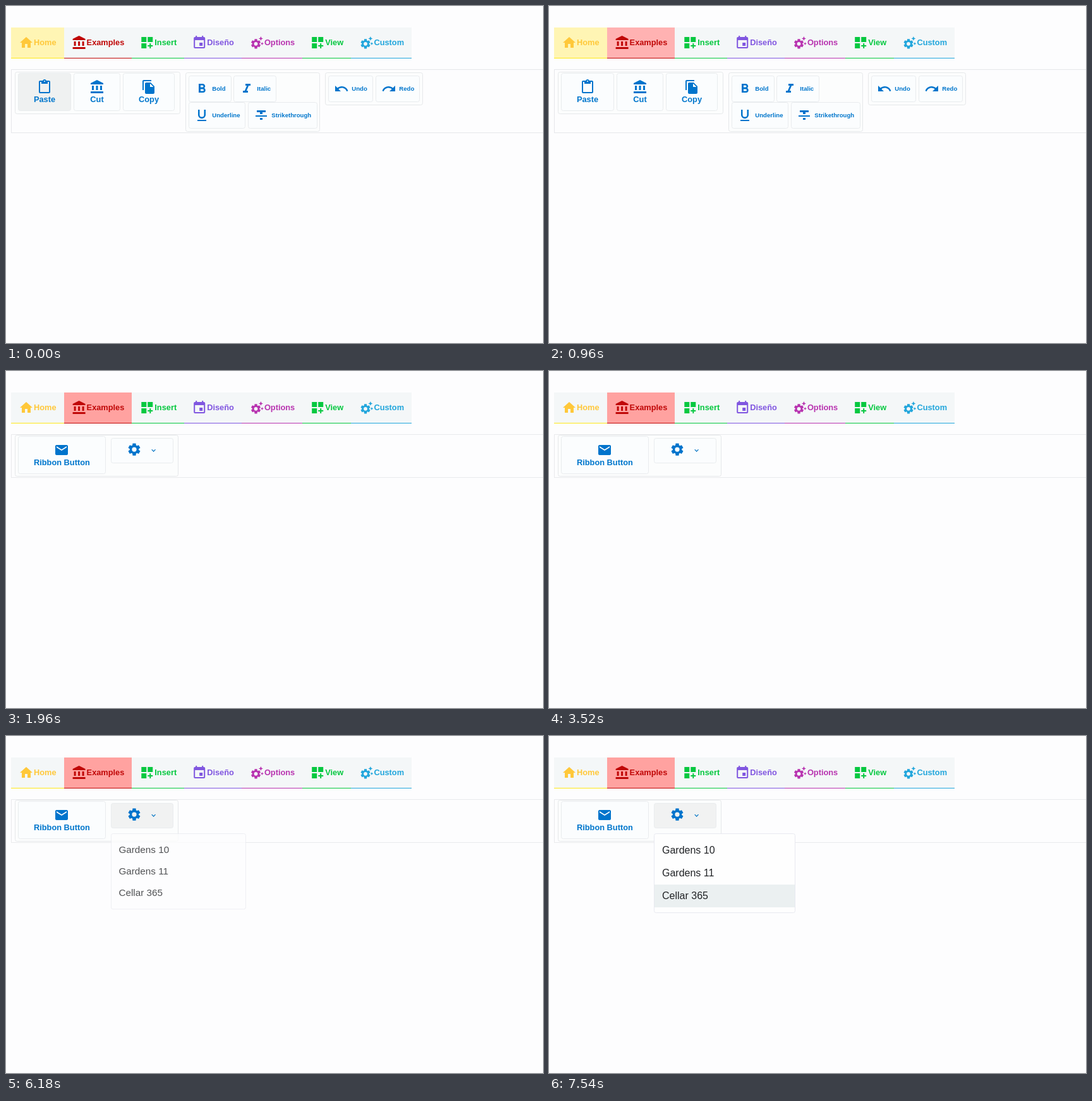
These frames come from a looping animation (850 by 533 pixels, 8000 ms). An HTML page:

```html
<!DOCTYPE html>
<html lang="en">
<head>
<meta charset="utf-8">
<title>Ribbon menu</title>
<style>
html, body { margin: 0; width: 100%; height: 100%; overflow: hidden; background: #fdfdfe; }
svg { display: block; width: 850px; height: 533px; font-family: "Liberation Sans", Arial, sans-serif; }
.tab, .big { font-size: 12.8px; font-weight: bold; }
.small { font-size: 9.6px; font-weight: bold; }
.big, .small { fill: #0076cc; }
.icon { fill: #0074cc; }
.box { fill: #fcfdfd; stroke: #e6e8ea; }
.button { fill: #fbfdfe; stroke: #e9ecee; }
.menu { font-size: 16px; fill: #212326; }
</style>
</head>
<body>
<svg id="stage" viewBox="0 0 850 533"></svg>
<script>
const icons = {
  home: 'M10 20v-6h4v6h5v-8h3L12 3 2 12h3v8z',
  bank: 'M4 10h3v7H4zM10.5 10h3v7h-3zM2 19h20v3H2zM17 10h3v7h-3zM12 1L2 6v2h20V6z',
  grid: 'M3 3h8v8H3zm10 0h8v8h-8zM3 13h8v8H3zm15 0h-2v3h-3v2h3v3h2v-3h3v-2h-3z',
  event: 'M17 12h-5v5h5zM16 1v2H8V1H6v2H5c-1.11 0-2 .9-2 2v14c0 1.1.89 2 2 2h14c1.1 0 2-.9 2-2V5c0-1.1-.9-2-2-2h-1V1zm3 18H5V8h14z',
  gear: 'M16.24 14.37l1.94 1.47-2 3.46-2.25-.93c-.31.22-.65.42-1.01.58l-.3 2.43h-4l-.3-2.43c-.36-.16-.7-.36-1.01-.58l-2.25.93-2-3.46L5 14.37a5 5 0 0 1 0-1.16l-1.94-1.47 2-3.46 2.25.93c.31-.22.65-.42 1.01-.58l.3-2.43h4l.3 2.43c.36.16.7.36 1.01.58l2.25-.93 2 3.46-1.94 1.47a5 5 0 0 1 0 1.16zM10.62 16.7a2.9 2.9 0 1 0 0-5.8 2.9 2.9 0 0 0 0 5.8z',
  stars: 'M17.41 6.59L15 5.5l2.41-1.09L18.5 2l1.09 2.41L22 5.5l-2.41 1.09L18.5 9zM21.28 12.72L20.5 11l-.78 1.72-1.72.78 1.72.78.78 1.72.78-1.72 1.72-.78z',
  paste: 'M19 2h-4.18C14.4.84 13.3 0 12 0S9.6.84 9.18 2H5c-1.1 0-2 .9-2 2v16c0 1.1.9 2 2 2h14c1.1 0 2-.9 2-2V4c0-1.1-.9-2-2-2zm-7 0a1 1 0 1 1 0 2 1 1 0 0 1 0-2zm7 18H5V4h2v3h10V4h2z',
  copy: 'M16 1H4c-1.1 0-2 .9-2 2v14h2V3h12zm-1 4l6 6v10c0 1.1-.9 2-2 2H8c-1.1 0-2-.9-2-2V7c0-1.1.9-2 2-2zm-1 7h5.5L14 6.5z',
  bold: 'M15.6 10.79c.97-.67 1.65-1.77 1.65-2.79 0-2.26-1.75-4-4-4H7v14h7.04c2.09 0 3.71-1.7 3.71-3.79 0-1.52-.86-2.82-2.15-3.42zM10 6.5h3a1.5 1.5 0 0 1 0 3h-3zm3.5 9H10v-3h3.5a1.5 1.5 0 0 1 0 3z',
  italic: 'M10 4v3h2.21l-3.42 8H6v3h8v-3h-2.21l3.42-8H18V4z',
  underline: 'M12 17c3.31 0 6-2.69 6-6V3h-2.5v8a3.5 3.5 0 0 1-7 0V3H6v8c0 3.31 2.69 6 6 6zm-7 2v2h14v-2z',
  strike: 'M10 19h4v-3h-4zM5 4v3h5v3h4V7h5V4zM3 14h18v-2H3z',
  undo: 'M12.5 8c-2.65 0-5.05.99-6.9 2.6L2 7v9h9l-3.62-3.62c1.39-1.16 3.16-1.88 5.12-1.88 3.54 0 6.55 2.31 7.6 5.5l2.37-.78C21.08 11.03 17.15 8 12.5 8z',
  redo: 'M18.4 10.6C16.55 8.99 14.15 8 11.5 8c-4.65 0-8.58 3.03-9.96 7.22L3.9 16c1.05-3.19 4.05-5.5 7.6-5.5 1.95 0 3.73.72 5.12 1.88L13 16h9V7z',
  mail: 'M20 4H4c-1.1 0-2 .9-2 2v12c0 1.1.9 2 2 2h16c1.1 0 2-.9 2-2V6c0-1.1-.9-2-2-2zm0 4l-8 5-8-5V6l8 5 8-5z'
};
icons.magic = icons.gear + icons.stars;

const icon = (name, x, y, attrs = 'class="icon"', scale = 1) =>
  `<path d="${icons[name]}" fill-rule="evenodd" transform="translate(${x} ${y}) scale(${scale})" ${attrs}/>`;
const text = (str, x, y, cls, attrs = '') =>
  `<text x="${x}" y="${y}" class="${cls}" ${attrs}>${str}</text>`;
const rect = (x1, y1, x2, y2, attrs) =>
  `<rect x="${x1}" y="${y1}" width="${x2 - x1}" height="${y2 - y1}" ${attrs}/>`;
const frame = (x1, y1, x2, y2, cls, attrs = '') =>
  rect(x1 + .5, y1 + .5, x2 - .5, y2 - .5, `rx="3" class="${cls}" ${attrs}`);

const idle = '#f4f7f8';
const tabs = [
  ['Home', 'home', 8, '#ffc83a', '#ffe816'], ['Examples', 'bank', 91.6, '#c00808'],
  ['Insert', 'grid', 199.3, '#06c840'], ['Diseño', 'event', 282.2, '#8056e0'],
  ['Options', 'magic', 372.9, '#b834b0'], ['View', 'grid', 469.2, '#06c840'],
  ['Custom', 'magic', 546.4, '#22a6dc']
].map(([label, name, x, color, line = color], i, all) => {
  const left = Math.round(x), right = i < 6 ? Math.round(all[i + 1][2]) : 642;
  return rect(left, 34, right, 83, `id="tab${i}" fill="${idle}"`) +
    rect(left, 82, right, 83, `fill="${line}"`) +
    icon(name, x + 12, 46, `fill="${color}"`) +
    text(label, x + 36, 62, 'tab', `fill="${color}"`);
}).join('');

const bigButton = (label, name, x1, x2, id) => {
  const mid = (x1 + x2) / 2;
  return frame(x1, 106, x2, 166, 'button', `id="${id}"`) +
    icon(name, mid - 12, 116) + text(label, mid, 152, 'big', 'text-anchor="middle"');
};
const smallButton = (label, name, x1, x2, y) =>
  frame(x1, y, x2, y + 42, 'button') +
  icon(name, x1 + 9, y + 9) + text(label, x1 + 37.3, y + 24, 'small');

const homePanel = `<g id="homePanel">
  ${rect(8.5, 100.5, 900, 200.5, 'fill="none" stroke="#e6e7ea"')}
  ${frame(14, 104, 276, 171, 'box')}${frame(284, 105, 497, 199, 'box')}${frame(505, 105, 660, 157, 'box')}
  ${bigButton('Paste', 'paste', 19, 103, 'paste')}
  ${bigButton('Cut', 'bank', 107, 181, 'cut')}
  ${bigButton('Copy', 'copy', 185, 267, 'copy')}
  ${smallButton('Bold', 'bold', 289, 357, 110)}
  ${smallButton('Italic', 'italic', 360, 428, 110)}
  ${smallButton('Underline', 'underline', 289, 379, 152)}
  ${smallButton('Strikethrough', 'strike', 383, 493, 152)}
  ${smallButton('Undo', 'undo', 510, 581, 110)}
  ${smallButton('Redo', 'redo', 585, 655, 110)}
</g>`;

const examplesPanel = `<g id="examplesPanel">
  ${rect(8.5, 100.5, 900, 168.5, 'fill="none" stroke="#e9eaec"')}
  ${frame(14, 101, 273, 167, 'box')}
  ${frame(19, 103, 158, 163, 'button')}
  ${icon('mail', 76, 113)}${text('Ribbon Button', 44, 149, 'big')}
  ${frame(166, 106, 265, 146, 'button', 'id="gearButton"')}
  ${icon('gear', 189.6, 106.7, undefined, 1.26)}
  <path d="M230.7 124.2l2.9 2.9 2.9-2.9" fill="none" stroke="#0074c4" stroke-width="1.2"/>
</g>`;

const menu = `<g id="menu">
  ${frame(166, 154, 390, 280, '', 'fill="#fefefe" stroke="#e8e9f0"')}
  ${rect(167, 235, 389, 271, 'id="hoverItem" fill="#ebf0f1"')}
  ${['Gardens 10', 'Gardens 11', 'Cellar 365'].map((s, i) => text(s, 179, 186 + 36 * i, 'menu')).join('')}
</g>`;

document.getElementById('stage').innerHTML = tabs + homePanel + examplesPanel + menu;

const set = (id, name, value) => document.getElementById(id).setAttribute(name, value);
const show = (id, on) => set(id, 'display', on ? 'inline' : 'none');
const fill = (id, color) => { document.getElementById(id).style.fill = color; };

function draw() {
  const t = performance.now() % 8000;
  const switched = t >= 1960, opened = t >= 6440;
  fill('tab0', switched ? idle : '#fff5b4');
  fill('tab1', switched ? '#ffa2a0' : t >= 960 ? '#ffb2b2' : t >= 840 ? '#fcd6d6' : idle);
  fill('paste', t < 440 ? '#eff1f1' : '#fbfdfe');
  show('homePanel', !switched);
  show('examplesPanel', switched);
  fill('gearButton', t >= 4200 ? '#f1f2f2' : '#fbfdfe');
  show('menu', t >= 6180);
  set('menu', 'opacity', opened ? 1 : .78);
  set('menu', 'transform', `translate(166 154) scale(${opened ? 1 : .955}) translate(-166 -154)`);
  show('hoverItem', t >= 6980);
  requestAnimationFrame(draw);
}
draw();
</script>
</body>
</html>
```
